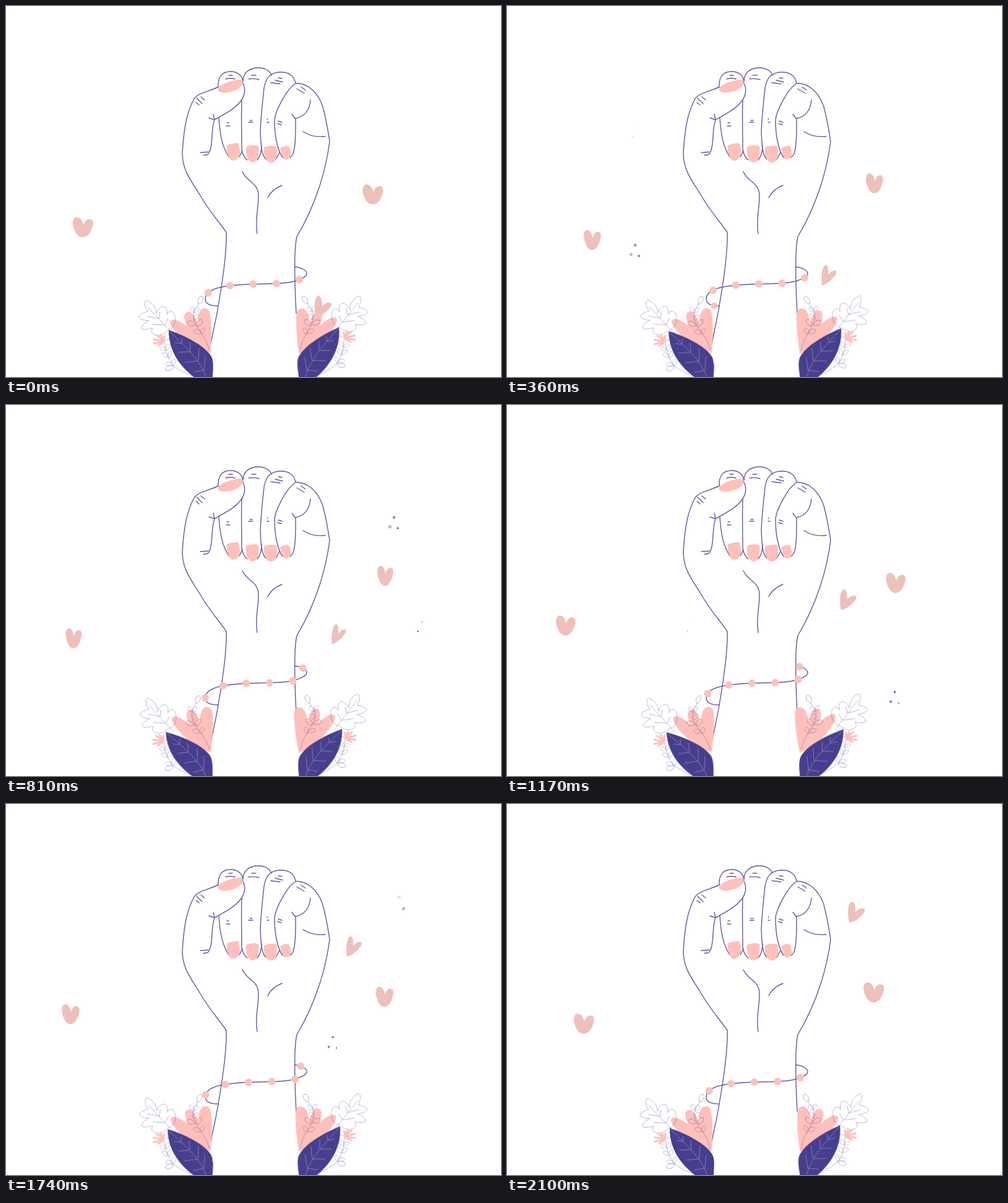
These frames come from a looping animation (800x600 px, 2130 ms). An HTML page:

```html
<!DOCTYPE html>
<html lang="en">
<head>
<meta charset="utf-8">
<title>Raised fist</title>
<style>
  html, body { margin: 0; width: 100%; height: 100%; overflow: hidden; background: #fff; }
  svg { display: block; width: 100vw; height: 100vh; }

  .line { fill: none; stroke: #473f90; stroke-width: 1.4; stroke-linecap: round; stroke-linejoin: round; opacity: .86; }
  .thin { fill: none; stroke: #473f90; stroke-width: .8; opacity: .48; }
  .pink { fill: #ffc0bb; }
  .dark { fill: #463f8f; }
  .vein { fill: none; stroke: #9b8aae; stroke-width: .8; }
  .bloom { fill: none; stroke: #ffc0bb; stroke-width: 3.2; stroke-linecap: round; }
  .heart { fill: #eec0ba; }
  .dot { fill: #463f8f; }

  .sway, .move, .squash, .dot { animation: 2130ms linear infinite; }
  .sway { animation-name: sway; transform-origin: 332px 600px; }
  .petals { --turn: 3.7deg; transform-origin: 331px 565px; }
  .sprig { --turn: -3.3deg; transform-origin: 328px 557px; }
  .oak { --turn: 1.1deg; }
  .side { --turn: -1.4deg; }
  .big { --turn: -4.2deg; transform-origin: 334px 600px; }
  @keyframes sway {
    0% { transform: rotate(0deg); animation-timing-function: cubic-bezier(.33, .1, .67, 1); }
    49.3% { transform: rotate(var(--turn)); animation-timing-function: cubic-bezier(.33, 0, .67, .9); }
    98.59%, 100% { transform: rotate(0deg); }
  }

  .squash { animation-name: squash; animation-timing-function: ease-in-out; }
  @keyframes squash {
    0%, 98.59%, 100% { transform: scaleX(1); }
    31% { transform: scaleX(.72); }
    52.1% { transform: scaleX(.97); }
    67.1% { transform: scaleX(.75); }
  }

  .left { animation-name: left; }
  @keyframes left {
    0% { transform: translate(124.5px, 358px); }
    16.9% { transform: translate(138px, 378.5px); }
    25.35% { transform: translate(130px, 383px); }
    38.03% { transform: translate(109.5px, 377.5px); }
    54.93% { transform: translate(95px, 357px); }
    66.2% { transform: translate(88.5px, 342px); }
    81.69% { transform: translate(104.5px, 340px); }
    98.59%, 100% { transform: translate(124.5px, 355.5px); }
  }
  .right { animation-name: right; }
  @keyframes right {
    0%, 98.59%, 100% { transform: translate(593px, 305px); }
    16.9% { transform: translate(594px, 287px); }
    25.35% { transform: translate(602.5px, 279px); }
    38.03% { transform: translate(613px, 276.5px); }
    54.93% { transform: translate(628.5px, 288px); }
    66.2% { transform: translate(628px, 302.5px); }
    81.69% { transform: translate(612px, 312px); }
  }
  .rise { animation-name: rise; }
  @keyframes rise {
    0% { transform: translate(512.5px, 486px); }
    16.9% { transform: translate(520.5px, 435px); }
    38.03% { transform: translate(538px, 370px); }
    54.93% { transform: translate(551.5px, 315px); }
    66.2% { transform: translate(556px, 281px); }
    81.69% { transform: translate(562.5px, 230px); }
    98.59%, 100% { transform: translate(565px, 175px); }
  }

  .dot { transform: scale(0); animation-name: pop; }
  @keyframes pop {
    0% { transform: scale(0); opacity: 1; }
    7% { opacity: 1; }
    12% { transform: scale(1); }
    17%, 100% { transform: scale(1); opacity: 0; }
  }
</style>
</head>
<body>
<svg id="stage" viewBox="0 0 800 600">
  <defs>
    <path id="heart" d="M.5,-3 C-.5,-12 -6,-17.5 -11,-16.5 C-18,-15 -18,-4 -14,4 C-11,12 -6,16 -.5,16 C6,16 12,10 15,0 C18,-9 16,-13.5 10,-13.5 C5,-13 2,-9 .5,-3Z"/>
  </defs>
  <g class="line">
    <!-- wrist and palm -->
    <path d="M331,546 C336,520 340,505 343,485 C350,445 357,400 356,366 C343,347 329,333 313,305 C298,281 285,265 285,238 C286,220 289,195 292,182 Q297,163 304,150 C310,141 325,139 343,131"/>
    <path d="M468,125 C489,124 505,142 512,163 C517,182 521,205 523,219 C518,260 503,318 470,373 C465,395 466,440 469,497"/>
    <path d="M382,268 C389,285 408,285 408,307 C408,330 402,345 406,368 M423,310 Q429,297 446,290 M480,203 Q494,213 516,211"/>
    <!-- thumb -->
    <path d="M382,123 C388,134 387,143 380,153 C370,167 352,175 337,184 C331,200 335,222 329,236 M328,181 L337,184 L335,175 M314,237 L329,236 M319,241 Q325,242 328,238"/>
    <!-- fingers -->
    <path d="M343,131 C342,114 350,106 363,106 C376,106 382,114 383,122 C383,108 393,100 408,100 C420,100 427,106 429,112"/>
    <path d="M344,181 C346,212 350,228 360,244 M377,244 Q380,239 382,234 M381,152 C380,180 381,208 381,233 Q384,245 390,249 M406,249 Q413,241 413,226"/>
    <path d="M468,125 C466,113 457,107 445,107 C430,107 420,113 417,133 C414,160 412,180 411,203 C412,222 412,240 420,248 M436,248 L442,237"/>
    <path d="M467,126 C453,135 434,172 434,186 C434,207 438,232 447,245 M459,245 Q462,243 464,239 C469,225 468,200 468,182 Q490,177 492,152 M462,175 L468,183"/>
    <!-- knuckle creases -->
    <path d="M360,112 h6 M355,118 Q363,116 370,118 M397,112 h7 M392,118 Q400,117 409,119 M435,120 L447,123 M428,124 L443,126 M440,116 L446,117 M470,134 L482,141 M477,131 L484,136 M308,149 L317,158 M315,147 L321,152 M307,156 L312,160 M357,189 h3 M356,194 h6 M394,185 h4 M392,188 h7 M422,183 h1 M422,188 h3 M440,186 L446,188 M439,190 L445,192"/>
    <path id="band" d="M343,485 C334,485 322,484 322,474 C322,462 338,456 354,453.5 C385,448.5 410,450 430,449 C448,448.5 458,447.5 467,445 C474,442.5 486,439 486,433 C486,428 478,423 467,422"/>
  </g>
  <g class="pink">
    <path d="M343,133 C347,125 370,119 379,119 C384,120 383,126 380,130 C372,139 352,142 346,139 C342,137 342,135 343,133Z"/>
    <path d="M357,226 C357,224 372,221 375,222 C377,224 379,236 378,240 C374,252 364,253 361,246 C358,240 356,232 357,226Z"/>
    <path d="M388,228 C390,225 405,224 408,227 C409,236 408,246 405,250 C400,255 394,253 391,248 C388,242 387,234 388,228Z"/>
    <path d="M417,229 C419,226 435,225 437,227 C439,236 438,246 435,250 C430,256 423,253 420,248 C417,242 416,234 417,229Z"/>
    <path d="M443,231 C444,228 455,225 457,227 C460,233 461,240 460,243 C456,249 450,250 448,246Z"/>
  </g>
  <g id="beads" class="pink"></g>

  <g id="bouquet">
    <g class="sway petals pink">
      <path d="M331,562 C318,545 307,520 311,500 C313,487 326,485 329,495 C333,510 332,540 331,562Z"/>
      <path d="M330,560 C310,545 290,520 288,503 C288,494 297,492 302,499 C312,515 325,540 330,560Z"/>
      <path d="M330,562 C300,555 267,525 265,512 C265,506 272,506 280,510 C300,520 320,540 330,562Z"/>
    </g>
    <g class="sway oak thin">
      <path d="M262,524 C273,522 276,505 271,497 C268,492 262,493 260,499 C261,490 258,485 253,486 C247,488 245,493 243,497 C243,487 236,479 227,476 C222,478 224,487 229,494 C222,496 214,500 215,503 C217,508 225,508 231,509 C224,512 218,517 219,521 C221,525 232,522 237,521 C234,525 235,529 239,531 C247,535 256,530 262,524Z"/>
      <path d="M270,530 L229,487 M247,506 L249,494 M246,505 L228,502 M257,516 L262,505 M256,516 L236,515"/>
    </g>
    <g class="sway sprig thin" id="sprig">
      <path d="M328,557 C326,535 300,515 303,500 C304,492 309,486 311,482"/>
    </g>
    <g class="sway side">
      <g class="thin" id="berries">
        <path d="M256,542 C258,560 262,575 275,585 Q286,593 306,600 M256,541 Q264,537 272,539"/>
      </g>
      <path class="bloom" d="M255,541 L244,533 M254,542 L239,539 M254,543 L239,546 M254,544 L246,549 M255,541 L250,532 M255,541 L256,533"/>
    </g>
    <g class="sway big">
      <path class="dark" d="M263,524 C292,534 322,550 332,567 C337,577 334,592 333,612 L324,612 C286,594 262,560 263,524Z"/>
      <path class="vein" d="M265,527 C295,555 315,575 324,602 M284,546 L285,537 M298,558 L297,544 M311,573 L312,553 M320,589 L322,567 M284,546 L273,544 M298,559 L279,560 M311,574 L289,576 M320,589 L303,592"/>
    </g>
  </g>

  <g id="dots"></g>

  <g class="heart">
    <g class="move left"><use class="squash" href="#heart"/></g>
    <g class="move right"><use class="squash" href="#heart"/></g>
    <g class="move rise"><g transform="rotate(30)"><g class="squash">
      <path transform="rotate(-30)" d="M-2,0 C-1,-10 -4,-18 -8,-17 C-14.5,-15 -15,2 -12,16.5 C-4,17 9,7 13,-1 C16,-8 6,-9 -2,0Z"/>
    </g></g></g>
  </g>
</svg>
<script>
  const LOOP = 2130, STEP = 30, GAP = 37.6, BEAD = 6;
  const $ = id => document.getElementById(id);

  function add(parent, tag, attrs) {
    const el = document.createElementNS('http://www.w3.org/2000/svg', tag);
    for (const key in attrs) el.setAttribute(key, attrs[key]);
    return parent.appendChild(el);
  }

  // Leaves grow from x, y towards an angle, with a size factor.
  function leaves(parent, list) {
    for (const [x, y, angle, size] of list) {
      add(parent, 'path', {
        d: 'M0,0 C-5,-4 -5,-12 0,-14 C5,-12 5,-4 0,0Z',
        transform: `translate(${x} ${y}) rotate(${angle}) scale(${size})`
      });
    }
  }
  leaves($('sprig'), [
    [311, 482, 25, 1], [304, 495, -35, .75], [304, 496, 40, .8], [304, 508, 35, .8],
    [306, 516, -70, 1], [308, 518, 40, 1], [315, 529, -70, .9], [316, 531, 20, .8]
  ]);
  leaves($('berries'), [
    [258, 556, -70, .7], [259, 557, 25, .8], [262, 568, -55, .8],
    [263, 569, 20, .8], [269, 580, -80, .8], [270, 582, 10, .8], [271, 583, -110, 1]
  ]);

  const mirror = add($('stage'), 'g', { transform: 'rotate(-4.5 481 489) translate(798.5 0) scale(-1 1)' });
  mirror.append(...$('bouquet').cloneNode(true).children);
  $('bouquet').after(mirror);

  // Sparkles: x, y and start time; each has three dots that pop in turn.
  const sparkles = [
    [205, 384.5, 80], [210, 196.5, 310], [625, 179.5, 540],
    [671.5, 350, 690], [625, 462.5, 950], [298, 350, 1110],
    [423.7, 46.7, 1190], [633, 148.5, 1370], [526.5, 375.5, 1530]
  ];
  const trio = [[-7, 15, 0], [0, 0, 45], [6.5, 18, 100]];
  for (const [x, y, start] of sparkles) {
    for (const [dx, dy, wait] of trio) {
      const spot = add($('dots'), 'g', { transform: `translate(${x + dx} ${y + dy})` });
      add(spot, 'circle', { class: 'dot', cx: 2.5, cy: 2.5, r: 2.5, style: `animation-delay:${start + wait}ms` });
    }
  }

  // Beads run along the band, one gap in ten steps.
  const band = $('band'), length = band.getTotalLength();
  const beads = Array.from({ length: 8 }, () => add($('beads'), 'circle', { r: 0 }));
  let origin = 0;
  while (band.getPointAtLength(origin).x < 399.5) origin += .1;

  function draw(ms) {
    const step = Math.floor(ms % LOOP / STEP);
    const first = (origin + step * GAP / 10) % GAP;
    beads.forEach((bead, i) => {
      const s = first + i * GAP;
      const p = band.getPointAtLength(Math.min(s, length));
      bead.setAttribute('cx', p.x);
      bead.setAttribute('cy', p.y);
      bead.setAttribute('r', s < length - 3 ? BEAD * Math.min(1, s / 9) : 0);
    });
  }

  const begin = performance.now();
  function tick(now) {
    draw(Math.max(0, now - begin));
    requestAnimationFrame(tick);
  }
  draw(0);
  requestAnimationFrame(tick);
</script>
</body>
</html>
```
